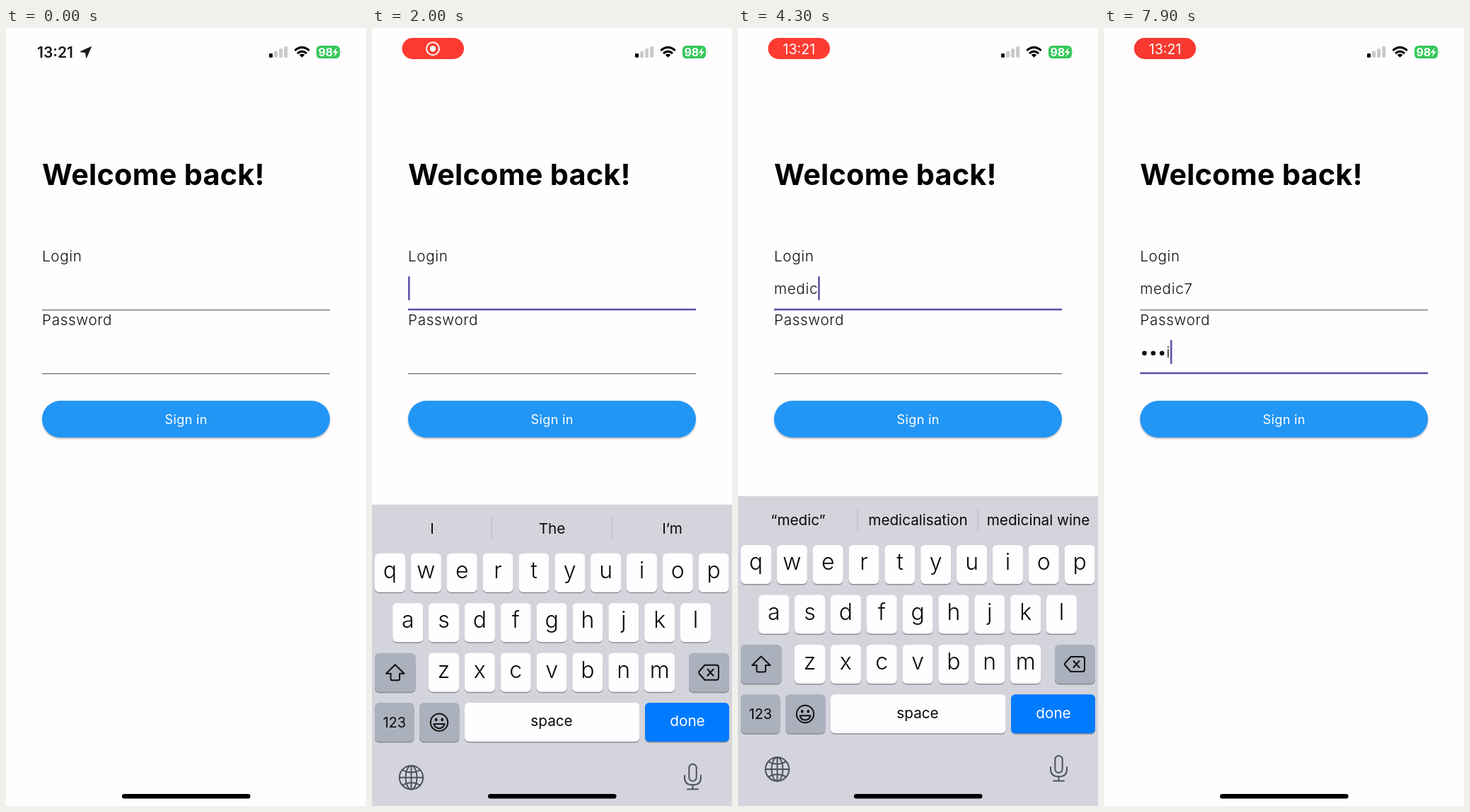
An HTML page that plays this animation: 509 by 1100 pixels, repeating every 8 s.

```html
<!DOCTYPE html>
<html lang="en">
<head>
<meta charset="utf-8">
<title>Sign in</title>
<style>
  html, body { margin: 0; width: 100%; height: 100%; overflow: hidden; background: #fffdfe; }
  svg { display: block; font-family: Inter, sans-serif; }
  .field { font-size: 20.7px; font-weight: 300; letter-spacing: .65px; fill: #111; }
  .line { fill: none; stroke: #111; stroke-width: 2; stroke-linecap: round; stroke-linejoin: round; }
  .soft { stroke: #50535b; }
  .mid { text-anchor: middle; }
</style>
</head>
<body>
<svg width="509" height="1100" viewBox="0 0 509 1100">
  <defs>
    <filter id="lift" x="-5%" y="-20%" width="110%" height="150%">
      <feDropShadow dx="0" dy="1.5" stdDeviation="1.2" flood-opacity=".33"/>
    </filter>
  </defs>
  <rect width="509" height="1100" fill="#fffdfe"/>

  <g id="clock" fill="#19191b">
    <text x="44" y="41.5" font-size="21" font-weight="600">13:21</text>
    <path d="M120.5 26.5L105 33.6L112.6 34.6L113.6 42.2Z" stroke="#19191b" stroke-linejoin="round"/>
  </g>
  <g id="pill">
    <rect id="pillBack" x="42.5" y="14" width="87.5" height="30" rx="15"/>
    <g id="record">
      <circle cx="86" cy="29.3" r="9" fill="none" stroke="#fff" stroke-width="2"/>
      <circle cx="86" cy="29.3" r="4.2" fill="#fff"/>
    </g>
    <text id="pillTime" class="mid" x="86.3" y="36.5" font-size="19.6" fill="#fff">13:21</text>
  </g>
  <g fill="#c9c8cb">
    <rect x="372" y="36" width="5" height="5.7" rx="1.3" fill="#000"/>
    <rect x="379.2" y="32.5" width="4.8" height="9.2" rx="1.3"/>
    <rect x="386.2" y="29.3" width="4.8" height="12.4" rx="1.3"/>
    <rect x="393.2" y="26" width="4.8" height="15.7" rx="1.3"/>
  </g>
  <path d="M408.3 31.8Q418.5 23 428.7 31.8M412 36Q418.5 30.4 425 36" fill="none" stroke="#000" stroke-width="3.1"/>
  <path d="M418.5 41.8l-3.7-3.8q3.7-2.9 7.4 0z"/>
  <rect x="439" y="25" width="33" height="18" rx="5.5" fill="#35c75a"/>
  <path d="M473.3 31.5q2.4 2.5 0 5z" fill="#a8dfb6"/>
  <text class="mid" x="451.8" y="39.7" font-size="16" font-weight="700" fill="#fff">98</text>
  <path d="M467.8 27.5l-6.3 7.6h4l-2 5.8 6.4-7.7h-4z" fill="#fff"/>

  <text x="51" y="221.5" font-size="41.4" font-weight="700" letter-spacing=".25" fill="#020203">Welcome back!</text>
  <text class="field" x="51" y="330.3">Login</text>
  <text class="field" x="51" y="420.3">Password</text>
  <text class="field" id="login" x="51" y="376"></text>
  <g id="dots" fill="#111"></g>
  <text class="field" id="lastChar" y="466"></text>
  <rect id="loginLine" x="51" width="407"/>
  <rect id="passLine" x="51" width="407"/>
  <rect id="cursor" width="2.6" height="34" rx="1" fill="#6250a6"/>
  <rect x="51" y="527" width="407" height="52" rx="26" fill="#2396f5" filter="url(#lift)"/>
  <text class="mid" x="254.7" y="560" font-size="18.1" letter-spacing=".35" fill="#fff">Sign in</text>

  <g id="keyboard"></g>
  <rect x="164" y="1083" width="181.5" height="6.4" rx="3.2" fill="#000"/>
</svg>

<script>
const $ = id => document.getElementById(id);
const LOOP = 8000, FOCUS = 1650, RISE = 1700, NUMBERS = 4900, DONE = 5680, PASS_FOCUS = 6400;
const PURPLE = '#6250a6', GREY = '#7b7980';

// [time, text, suggestions, highlight the middle one]
const typing = [
  [0, '', ['I', 'The', 'I’m']],
  [2600, 'm', ['“m”', 'my', 'me'], true],
  [3000, 'me', ['“me”', 'my', 'med'], true],
  [3450, 'med', ['“med”', 'medical', 'media']],
  [3800, 'medi', ['“medi”', 'medical', 'medicine']],
  [4150, 'medic', ['“medic”', 'medicalisation', 'medicinal wine']],
  [5200, 'medic7', ['“medic”', 'medicalisation', 'medicinal wine']]
];
const passTyping = [[0, ''], [6750, 'm'], [7050, 'me'], [7400, 'med'], [7780, 'medi']];

const clamp = x => Math.max(0, Math.min(1, x));
const ramp = (t, from, length) => clamp((t - from) / length);
const current = (list, t) => list.filter(entry => entry[0] <= t).pop();
// Share of the way still left in a critically damped spring
const spring = ms => ms <= 0 ? 1 : Math.exp(-.01826 * ms) * (1 + .01826 * ms);

const label = (x, y, text, size, weight = 400, fill = '#0b0b0c') =>
  `<text class="mid" x="${x}" y="${y}" font-size="${size}" font-weight="${weight}" fill="${fill}">${text}</text>`;
const key = (x, y, w, fill = '#fffdff') =>
  `<rect x="${x}" y="${y + 1.4}" width="${w}" height="55" rx="6" fill="#8b8d93"/>
   <rect x="${x}" y="${y}" width="${w}" height="55" rx="6" fill="${fill}"/>`;
const row = (chars, x, y, base, size, weight, w = 43, pitch = 50.85) =>
  [...chars].map((c, i) => key(x + i * pitch, y, w) +
    label(x + i * pitch + w / 2, y + base, c === '&' ? '&amp;' : c, size, weight)).join('');

const DARK = '#abb0bd';
$('keyboard').innerHTML = `
  <rect y="662" width="509" height="460" fill="#d3d4dc"/>
  <rect id="highlight" x="169.5" y="670" width="170" height="50.5" rx="6" fill="#ecedf0"/>
  <path id="dividers" d="M169 679V711.5M339 679V711.5" stroke="#bcbec6" stroke-width="1.3"/>
  ${[85, 254.5, 424.5].map(x => label(x, 703, '', 20.7)).join('')}
  ${key(4, 872, 57.5, DARK) + key(448, 872, 57, DARK)}
  ${key(4, 942.3, 55.5, DARK) + key(67, 942.3, 56.5, DARK)}
  ${key(131, 942.3, 247.5) + key(386, 942.3, 119, '#007aff')}
  ${label(254, 975.5, 'space', 20.7) + label(446, 975.5, 'done', 20.7, 400, '#fff')}
  <g id="letters">
    ${row('qwertyuiop', 4, 731, 35, 32, 300)}
    ${row('asdfghjkl', 29.2, 801.5, 35, 32, 300)}
    ${row('zxcvbnm', 80, 872, 35, 32, 300)}
    ${label(31.8, 977, '123', 20)}
    <path class="line" d="M32.7 888.5L45.5 901H39V908.5Q39 910.5 37 910.5H28.5Q26.5 910.5 26.5 908.5V901H20Z"/>
  </g>
  <g id="numbers">
    ${row('1234567890', 4, 731, 39, 28, 400)}
    ${row('-/:;()₽&@”', 4, 801.5, 36.5, 26, 400)}
    ${row('.,?!’', 80, 872, 38, 27, 400, 63.5, 71.45)}
    ${label(32.5, 906, '#+=', 16.5) + label(31.8, 977, 'ABC', 17.5)}
  </g>
  <path class="line" d="M470.5 889H487Q490 889 490 892V907Q490 910 487 910H470.5L462.5 901Q461.5 899.5 462.5 898ZM474.5 895L482.5 904M482.5 895L474.5 904"/>
  <circle class="line" cx="95" cy="970" r="12.2"/>
  <ellipse cx="90.7" cy="966.3" rx="1.7" ry="2.3"/><ellipse cx="99.3" cy="966.3" rx="1.7" ry="2.3"/>
  <path class="line" d="M87.5 972.3H102.5Q101 978.5 95 978.5T87.5 972.3Z"/>
  <g class="line soft">
    <circle cx="55.5" cy="1048" r="16.7"/><ellipse cx="55.5" cy="1048" rx="8" ry="16.7"/>
    <path d="M55.5 1031.3V1064.7M38.8 1048H72.2M43 1037.3Q55.5 1044 68 1037.3M43 1058.7Q55.5 1052 68 1058.7"/>
    <rect x="448.3" y="1029" width="10.4" height="24" rx="5.2"/>
    <path d="M442 1045V1048Q442 1058.5 453.5 1058.5T465 1048V1045M453.5 1058.5V1064.5M446 1064.5H461"/>
  </g>`;
const suggestionTexts = document.querySelectorAll('#keyboard > text');

const show = (id, opacity) => $(id).setAttribute('opacity', +opacity);
const place = (el, attrs) => { for (const name in attrs) el.setAttribute(name, attrs[name]); };

function underline(id, y, focused) {
  place($(id), focused
    ? { y: y - 2.1, height: 2.6, fill: PURPLE }
    : { y: y - .8, height: 1.4, fill: GREY });
}

function drawStatus(t) {
  const pill = ramp(t, 150, 150), swap = ramp(t, 3030, 380);
  const glow = (1 + Math.cos((t - 200) * Math.PI / 1000)) / 2;
  show('clock', 1 - pill);
  show('pill', pill);
  show('record', 1 - swap);
  show('pillTime', swap);
  $('pillBack').setAttribute('fill', `rgb(${219 + 36 * glow},${50 + 9 * glow},${44 + 5 * glow})`);
}

function drawForm(t) {
  const [loginTime, login] = current(typing, t);
  const [passTime, pass] = current(passTyping, t);
  const onLogin = t >= FOCUS && t < DONE, onPass = t >= PASS_FOCUS;
  underline('loginLine', 398.8, onLogin);
  underline('passLine', 488.8, onPass);

  $('login').textContent = login;
  const hidden = Math.max(0, pass.length - 1), lastX = 51 + 12.4 * hidden;
  $('dots').innerHTML = [...Array(hidden).keys()]
    .map(i => `<circle cx="${57.2 + 12.4 * i}" cy="459.7" r="3.3"/>`).join('');
  $('lastChar').textContent = pass.slice(-1);
  $('lastChar').setAttribute('x', lastX);

  const phase = (t - (onPass ? Math.max(PASS_FOCUS, passTime) : Math.max(FOCUS, loginTime))) % 1000;
  const blink = Math.max(1 - ramp(phase, 500, 100), ramp(phase, 900, 100));
  const x = onPass ? lastX + $('lastChar').getComputedTextLength() : 51 + $('login').getComputedTextLength();
  place($('cursor'), { x, y: onPass ? 441 : 351, opacity: onLogin || onPass ? blink : 0 });
}

function drawKeyboard(t) {
  const [, , words, highlighted] = current(typing, t);
  const drop = t < DONE ? spring(t - RISE) : 1 - spring(t - DONE);
  $('keyboard').setAttribute('transform', `translate(0 ${440 * drop})`);
  show('keyboard', t > RISE && t < DONE + 420);
  show('letters', t < NUMBERS);
  show('numbers', t >= NUMBERS);
  show('highlight', !!highlighted);
  show('dividers', !highlighted);
  suggestionTexts.forEach((el, i) => { if (i < 3) el.textContent = words[i]; });
}

function frame() {
  const t = performance.now() % LOOP;
  drawStatus(t);
  drawForm(t);
  drawKeyboard(t);
  requestAnimationFrame(frame);
}
frame();
</script>
</body>
</html>
```
